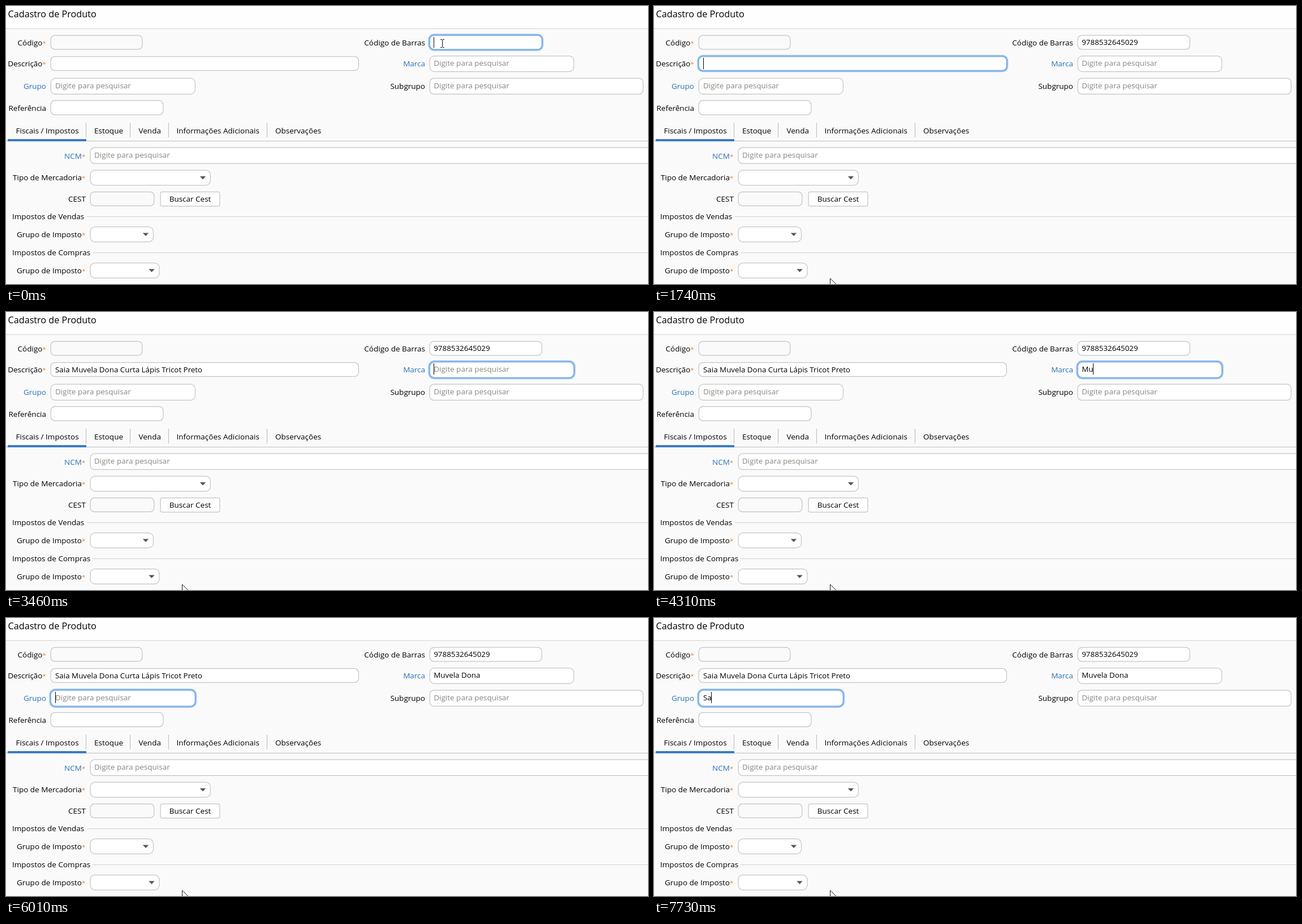
These frames come from a looping animation (1135 by 493 pixels, 8000 ms). An HTML page with a canvas:

```html
<!DOCTYPE html>
<html lang="pt-BR">
<head>
<meta charset="utf-8">
<title>Cadastro de Produto</title>
<style>
html, body { margin: 0; width: 100%; height: 100%; overflow: hidden; background: #fafafa; }
canvas { display: block; }
</style>
</head>
<body>
<canvas id="stage" width="1135" height="493"></canvas>
<script>
const ctx = document.getElementById('stage').getContext('2d');
const FAMILY = '"Open Sans", "Noto Sans", sans-serif';
const LABEL = 13.5, VALUE = 13.38;
const INK = '#000', LINK = '#2a72b8', HINT = '#8b857f', BORDER = '#c4c4c4', STAR = '#e5873f';
const PAGE = '#fafafa';
const LOOP = 8000;

const BARCODE = '9788532645029';
const BRAND = 'Muvela Dona';
const DESCRIPTION = `Saia ${BRAND} Curta Lápis Tricot Preto`;

// Editable fields: box, text origin, baseline, caret top and height.
const fields = {
  barcode: { x: 748.5, y: 51.5, w: 199.5, h: 26, tx: 756.2, base: 69, top: 55, tall: 19 },
  description: { x: 78.5, y: 89, w: 545.5, h: 26, tx: 87, base: 107, top: 92, tall: 20 },
  brand: { x: 748.5, y: 88, w: 256, h: 29, tx: 756.2, base: 106, top: 91, tall: 20, hint: true },
  group: { x: 78.5, y: 127.5, w: 256.5, h: 29.5, tx: 87, base: 146, top: 131, tall: 20, hint: true }
};

// Each step sets the focused field and what it holds from that time on.
const steps = [
  [0, 'barcode', ''],
  [870, 'barcode', BARCODE],
  [1740, 'description', ''],
  [2610, 'description', DESCRIPTION],
  [3460, 'brand', ''],
  [4310, 'brand', BRAND.slice(0, 2)],
  [5160, 'brand', BRAND],
  [6010, 'group', ''],
  [6860, 'group', 'S'],
  [7730, 'group', 'Sa']
];

function text(str, x, y, color = INK, size = LABEL, align = 'left') {
  ctx.font = `${size}px ${FAMILY}`;
  ctx.fillStyle = color;
  ctx.textAlign = align;
  ctx.fillText(str, x, y);
}

function label(str, right, y, { color = INK, star = false } = {}) {
  text(str, right, y, color, LABEL, 'right');
  if (star) text('*', right, y, STAR, 11.5);
}

function rect(x, y, w, h, color) {
  ctx.fillStyle = color;
  ctx.fillRect(x, y, w, h);
}

function rounded(x, y, w, h, r, color) {
  ctx.beginPath();
  ctx.roundRect(x, y, w, h, r);
  ctx.fillStyle = color;
  ctx.fill();
}

function box(x, y, w, h, { r = 8, fill = '#fff', focus = false } = {}) {
  const layer = (pad, color) =>
    rounded(x - pad, y - pad, w + 2 * pad, h + 2 * pad, r + pad, color);
  if (focus) {
    layer(2.2, '#a3c8f0');
    layer(1.2, '#84b4e8');
    layer(-1.5, fill);
  } else {
    layer(0, BORDER);
    layer(-1.2, fill);
  }
}

function combo(x, y, w, h) {
  box(x, y, w, h, { r: 9 });
  const cx = x + w - 14, cy = y + h / 2 - 2.5;
  ctx.beginPath();
  ctx.moveTo(cx - 5.2, cy);
  ctx.lineTo(cx + 5.2, cy);
  ctx.lineTo(cx, cy + 5.5);
  ctx.fillStyle = '#555';
  ctx.fill();
}

function hint(x, y) {
  text('Digite para pesquisar', x, y, HINT);
}

function section(str, y, lineStart) {
  text(str, 11, y);
  rect(lineStart, y - 5, 1135 - lineStart, 1, '#d0d0d0');
}

function drawForm() {
  rect(0, 0, 1135, 493, PAGE);
  rect(0, 0, 1135, 40, '#fefefe');
  rect(0, 39.5, 1135, 1, '#d2d2d2');
  text('Cadastro de Produto', 3.5, 19.5, INK, 16.2);

  label('Código', 64.5, 70, { star: true });
  label('Descrição', 64.5, 107, { star: true });
  label('Grupo', 71, 147, { color: LINK });
  label('Referência', 71, 186);
  label('Código de Barras', 741, 70);
  label('Marca', 741, 107, { color: LINK });
  label('Subgrupo', 741, 147);

  box(78.5, 51.5, 163, 26, { fill: PAGE });
  box(78.5, 167, 200, 26.5);
  box(748.5, 127.5, 378.5, 29.5);
  hint(756.2, 146);

  rect(0, 239, 1135, 1, '#bebebe');
  rect(3, 236, 139, 4, '#3a7bc4');
  [['Fiscais / Impostos', 17.5], ['Estoque', 156], ['Venda', 234.5],
    ['Informações Adicionais', 301.5], ['Observações', 476]].forEach(([s, x]) => text(s, x, 226));
  [141, 219, 287, 461].forEach(x => rect(x, 207, 1, 26, '#b9b9b9'));

  label('NCM', 134, 271, { color: LINK, star: true });
  box(148.5, 250.5, 1100, 29.5);
  hint(156, 269);

  label('Tipo de Mercadoria', 134, 309, { star: true });
  combo(148.5, 290.5, 213.5, 28);

  label('CEST', 141, 347);
  box(148.5, 329, 114, 26, { fill: PAGE });
  box(272.5, 329, 106, 26.5, { r: 4 });
  text('Buscar Cest', 325.5, 347, INK, LABEL, 'center');

  section('Impostos de Vendas', 378, 143);
  label('Grupo de Imposto', 134, 410, { star: true });
  combo(148.5, 391, 112.5, 28);

  section('Impostos de Compras', 442, 153);
  label('Grupo de Imposto', 134, 474, { star: true });
  combo(148.5, 455, 123, 28);
}

function drawField(f, value, focus) {
  box(f.x, f.y, f.w, f.h, { focus, r: f.hint ? 9 : 8 });
  if (value) text(value, f.tx, f.base, INK, VALUE);
  else if (f.hint) hint(f.tx, f.base);
  if (!focus) return;
  ctx.font = `${VALUE}px ${FAMILY}`;
  rect(Math.floor(f.tx + ctx.measureText(value).width), f.top, 1, f.tall, '#000');
}

function drawTextCursor() {
  rect(771, 60, 1, 13, '#111');
  for (const y of [59, 73]) {
    rect(768, y, 3, 1, '#111');
    rect(772, y, 3, 1, '#111');
  }
}

function drawPointer() {
  ctx.beginPath();
  ctx.moveTo(311.5, 483);
  ctx.lineTo(311.5, 500);
  ctx.lineTo(315.5, 496);
  ctx.lineTo(323.5, 495);
  ctx.closePath();
  ctx.fillStyle = '#fff';
  ctx.fill();
  ctx.strokeStyle = '#111';
  ctx.lineWidth = 1;
  ctx.stroke();
}

function draw(time) {
  const values = {};
  let active;
  for (const [start, name, value] of steps) {
    if (start > time) break;
    values[name] = value;
    active = name;
  }
  drawForm();
  for (const name in fields) drawField(fields[name], values[name] || '', name === active);
  if (time < 870) drawTextCursor();
  if (time >= 1740) drawPointer();
}

const begin = performance.now();
function tick() {
  draw((performance.now() - begin) % LOOP);
  requestAnimationFrame(tick);
}
tick();
</script>
</body>
</html>
```
